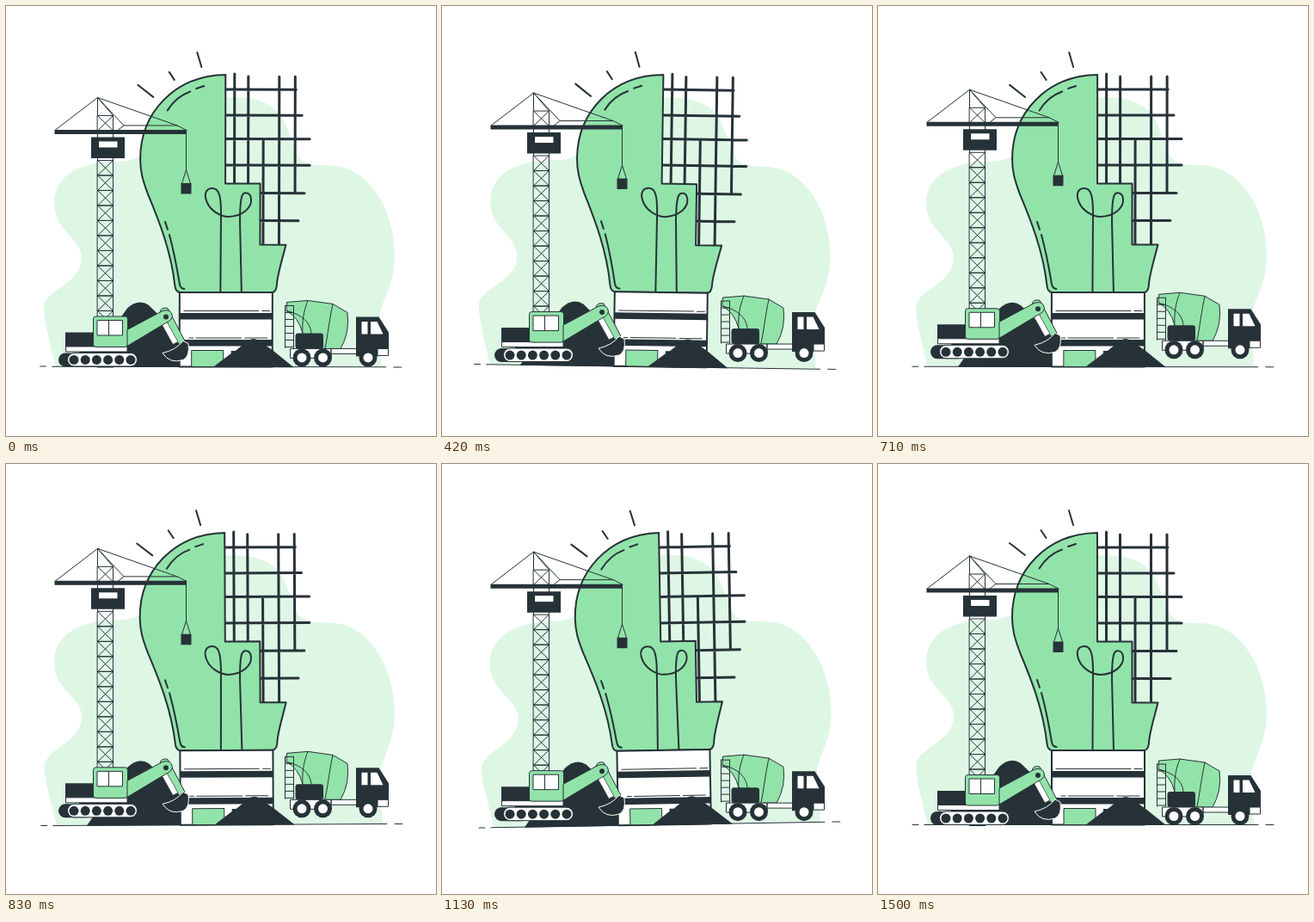
Animation, 500 px wide and 500 px high, one loop 1540 ms. Source, as an HTML page:

```html
<!DOCTYPE html>
<html lang="en">
<head>
<meta charset="utf-8">
<title>Building an idea</title>
<style>
  html, body { margin: 0; height: 100%; overflow: hidden; background: #fff; }
  svg { display: block; width: 100vw; height: 100vh; stroke-linejoin: round; }
  .line { fill: none; stroke: #263238; stroke-linecap: round; }
  .dark { fill: #263238; }
  .white { fill: #fff; stroke: #263238; }
  .green { fill: #92e3a9; stroke: #263238; }
  .glass { fill: #fff; }
</style>
</head>
<body>
<svg viewBox="0 0 500 500">
  <g id="sway">
    <path fill="#def7e5" d="M58 419C52 395 41 355 45 346C52 328 88 322 88 292C86 268 56 262 56 230C56 195 90 181 130 181C190 180 200 106 265 106C330 106 325 150 340 175C350 189 370 183 385 186C425 192 452 240 452 290C452 325 437 340 434 362C432 380 437 400 437 419Z"/>
    <path class="line" stroke-width="2" d="M222 54L227 71M189.500 77L195.500 86M153 92L171 106"/>
    <path class="line" stroke-width="3" d="M265.500 79V206M281.500 82V206M299 155V277M317.500 82V277M336 82V217M255 97H337M255 127H344M255 154.500H353M255 185H353M295 217.500H347M295 249.500H340"/>

    <path class="green" stroke-width="2" d="M255 80V206.500H295.500V277.500H325.500C321 296 315 314 315 325Q314 333 309 333H202Q197 332 196.500 325C192 285 178 250 165 219C159 203 156 193 156 178C156 125 195 81 255 80Z"/>
    <path class="line" stroke-width="2" d="M187.500 121.500C194 111 204 103 214 99.500M221 96L230 93M185 251L188 260M190 266C196 288 199 305 202 323Q203 329 207.500 329"/>
    <path class="line" stroke-width="2" d="M249.500 332L250 240C250 217 246 212 240 212C232 212 231 219 232 223C235 238 250 245 259 245C276 244 286 234 285 224C284 216 276 215 274 222C272 229 272 240 272 250L274 332"/>

    <path class="dark" d="M93 420L141 352Q154 340 166 348L240 420Z"/>
    <path class="white" stroke-width="2" d="M202 333H310V419.500H202Z"/>
    <path class="dark" d="M202 357H310V364.500H202ZM202 388H310V395.500H202Z"/>
    <path class="line" d="M207 354.500H294M298 354.500H307M213 386H218M221 386H274M278 386H304"/>
    <path class="green" d="M216 400.500H253V419.500H216Z"/>
    <path class="dark" d="M241 420L262 404V401L267 401L282 389Q288 385 294 389L310 400L335 420Z"/>
    <path class="line" d="M40 419.500H47M54 419.500H442M451 419.500H460"/>
  </g>

  <g id="lift">
    <g id="crane">
      <path class="line" id="mast"/>
      <path class="line" d="M106.500 128V107L57 145M106.500 107L124.500 128V153M106.500 107L137 139.500H199M106.500 107L199 139.500L210 145M137 139.500L125 149M209.500 149V191L204.500 207M209.500 191L214.500 207"/>
      <path class="dark" d="M56.500 144.500H210V149.500H56.500ZM99 153H138V177.500H99ZM203.500 206.500H215.500V219H203.500ZM106 419H125V421H106Z"/>
      <path class="glass" d="M108 158H129.500V165H108Z"/>
    </g>

    <g id="excavator">
      <path class="dark" d="M69 380H102V397H69ZM85 401H130V406H85Z"/>
      <path class="white" d="M69.500 396.500H141V402.500H69.500Z"/>
      <rect class="green" x="101.500" y="361.500" width="40" height="35.500" rx="3"/>
      <path class="white" d="M106 366H135.500V383.500H106ZM119.500 366V383.500"/>
      <path class="green" d="M179 357Q180 350 188 352L208 390L201 394Z"/>
      <path class="white" stroke-width=".7" d="M179 367L185 364L200 391L194 394Z"/>
      <path class="green" d="M141 377L182 355Q192 352 193.500 361Q193 366 186 369L141 396Z"/>
      <circle class="dark" cx="186" cy="362" r="3"/>
      <path class="dark" stroke="#fff" d="M182 404Q197 401 206 390L212 393Q214 408 206 412Q190 417 182 404Z"/>
      <rect class="dark" x="61" y="404" width="40" height="16" rx="8"/>
      <rect class="white" x="71.500" y="404" width="81" height="15.500" rx="7.750"/>
      <g id="rollers" class="dark"></g>
    </g>

    <g id="truck">
      <path class="green" d="M326.500 345L351 343L380 347L397 357Q400 380 389 399H345V381Q340 362 326 355Z"/>
      <path class="line" d="M351 343C346 355 344 368 345 382M380 347C376 365 374 385 371 398M326 355C345 359 355 370 355 382"/>
      <path class="line" id="ladder" d="M324.500 349V398M334.500 349V398"/>
      <rect class="dark" x="336.500" y="381" width="32.500" height="18" rx="3"/>
      <path class="white" d="M330.500 399H378V410H330.500ZM378 399H408V405H378ZM432 399H444.500V407H432Z"/>
      <path class="dark" d="M407 362H433.500L445 380V399H432V408H407Z"/>
      <path class="glass" d="M413.500 367.500H420.500V382H413.500ZM424 367.500H431.500L438.500 382H424Z"/>
      <g id="wheels"></g>
    </g>
  </g>
</svg>
<script>
  const LOOP = 1540, FPS = 24, POSES = 37;
  const $ = id => document.getElementById(id);
  const circle = (x, y, r, cls) => `<circle class="${cls}" cx="${x}" cy="${y}" r="${r}"/>`;

  const bay = y => `M106.500 ${y}H124.500V${y + 17.5}H106.500ZL124.500 ${y + 17.5}M124.500 ${y}L106.500 ${y + 17.5}`;
  let mast = bay(128) + 'M106.500 145V180M124.500 145V180';
  for (let i = 0; i < 13; i++) mast += bay(180 + i * 17.5);
  $('mast').setAttribute('d', mast);

  let rungs = $('ladder').getAttribute('d');
  for (let i = 0; i < 7; i++) rungs += `M324.500 ${349 + i * 8}H334.500`;
  $('ladder').setAttribute('d', rungs);

  $('rollers').innerHTML = [0, 1, 2, 3, 4, 5].map(i => circle(79 + i * 13.2, 412, 5.5, 'dark')).join('');
  $('wheels').innerHTML = [344, 368.5, 421]
    .map(x => circle(x, 409.5, 10.5, 'dark') + circle(x, 409.5, 5.5, 'glass')).join('');

  // The motion advances in 24 poses per second.
  function draw(now) {
    const pose = Math.min(POSES - 1, Math.floor((now % LOOP + 5) * FPS / 1000));
    const p = (pose + 1) / POSES;
    const angle = p < .25 ? 4 * p : p < .75 ? 2 - 4 * p : 4 * p - 4;
    const rise = 10 - 20 * Math.abs(p - .5);
    $('sway').setAttribute('transform', `rotate(${angle} 250 250)`);
    $('lift').setAttribute('transform', `translate(0 ${-rise})`);
  }

  let start;
  function tick(now) {
    start ??= now;
    draw(now - start);
    requestAnimationFrame(tick);
  }
  draw(0);
  requestAnimationFrame(tick);
</script>
</body>
</html>
```
